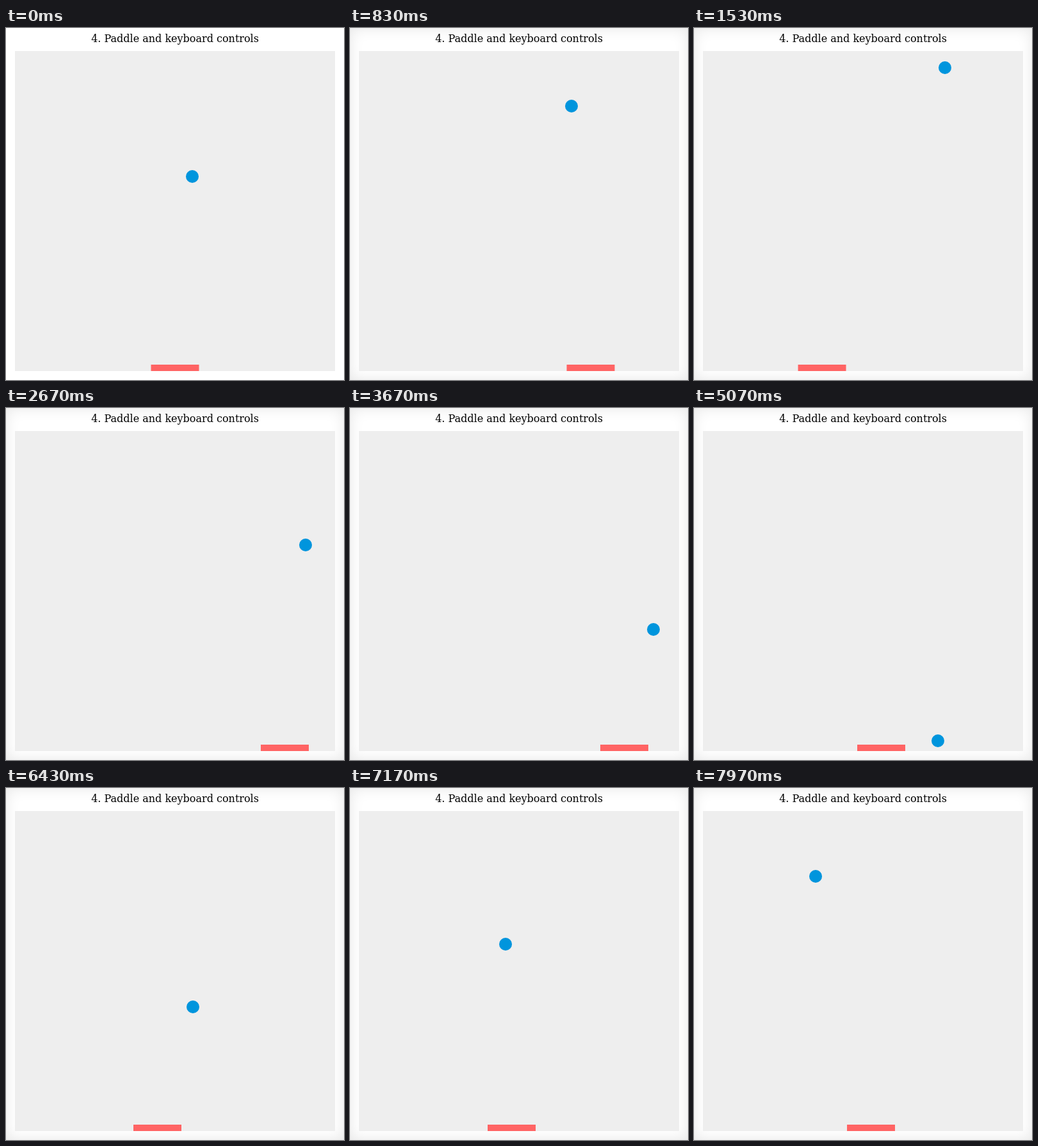
Animation, 528 px wide and 550 px high, one loop 8 s. Source, as an HTML page with a canvas:

```html
<!DOCTYPE html>
<html lang="en">
<head>
<meta charset="utf-8">
<title>Paddle and keyboard controls</title>
<style>
  html, body { margin: 0; width: 100%; height: 100%; overflow: hidden; background: #fff; }
  #stage { position: relative; width: 528px; height: 550px; }
  #stage.lit { box-shadow: inset 0 0 22px rgba(0, 0, 0, .1); }
  h1 {
    position: absolute; top: 7px; left: .05px; width: 100%; margin: 0;
    font: 16px/19px "DejaVu Serif", serif; text-align: center; color: #000;
  }
  canvas { position: absolute; left: 14px; top: 36px; background: #eee; }
</style>
</head>
<body>
<div id="stage">
  <h1>4. Paddle and keyboard controls</h1>
  <canvas width="500" height="500"></canvas>
</div>
<script>
  const LOOP = 8000, TICK = 15.122, SIZE = 500;
  const RADIUS = 10, PADDLE_W = 75, PADDLE_H = 10, PADDLE_STEP = 8;
  const stage = document.getElementById('stage');
  const ctx = document.querySelector('canvas').getContext('2d');

  // Each key press: when it starts and where it takes the paddle.
  const presses = [
    { at: 618, to: 412.5 }, { at: 1025, to: 0 }, { at: 1950, to: 425 },
    { at: 3579, to: 1 }, { at: 4408, to: 289 }, { at: 4979, to: 169 },
    { at: 5436, to: 425 }, { at: 5975, to: 161 }, { at: 6640, to: 265 },
    { at: 7050, to: 193 }, { at: 7750, to: 225 }
  ];

  function paddleX(t) {
    let x = (SIZE - PADDLE_W) / 2;
    for (const { at, to } of presses) {
      if (at > t) break;
      const reach = PADDLE_STEP * Math.round((t - at) / TICK);
      x += Math.sign(to - x) * Math.min(reach, Math.abs(to - x));
    }
    return x;
  }

  // Reflects a coordinate between the two walls.
  function bounce(pos) {
    const range = SIZE - 2 * RADIUS, period = 2 * range;
    const p = (((pos - RADIUS) % period) + period) % period;
    return RADIUS + (p > range ? period - p : p);
  }

  function draw(now) {
    // 30 pictures per second on a 10 ms clock
    const index = Math.floor((3 * Math.floor((now % LOOP) / 10) + 1) / 10);
    const t = 10 * Math.round(index * 10 / 3);
    const ticks = Math.round(t / TICK + .25);

    stage.classList.toggle('lit', index > 0);
    ctx.clearRect(0, 0, SIZE, SIZE);
    ctx.fillStyle = '#0095dd';
    ctx.beginPath();
    ctx.arc(bounce(277 + ticks), bounce(196 - 2 * ticks), RADIUS, 0, Math.PI * 2);
    ctx.fill();
    ctx.fillStyle = '#ff6464';
    ctx.fillRect(paddleX(t), SIZE - PADDLE_H, PADDLE_W, PADDLE_H);
  }

  const start = performance.now();
  function frame() {
    draw(performance.now() - start);
    requestAnimationFrame(frame);
  }
  frame();
</script>
</body>
</html>
```
